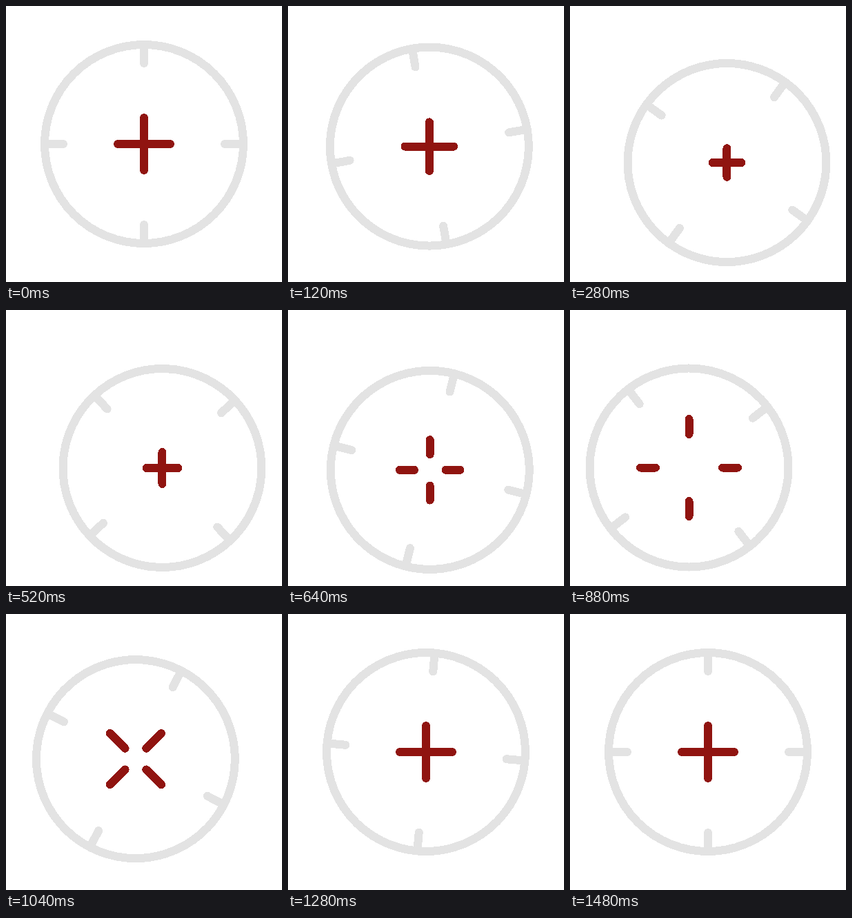
An HTML page that plays this animation: 400 px wide and 400 px high, repeating every 1.56 s.

```html
<!DOCTYPE html>
<html lang="en">
<head>
<meta charset="utf-8">
<title>Crosshair</title>
<style>
  html, body { margin: 0; width: 100%; height: 100%; overflow: hidden; background: #fff; }
  svg { display: block; width: 100%; height: 100%; }
  g { fill: none; stroke-width: 12; stroke-linecap: round; shape-rendering: crispEdges; }
  #ring { stroke: #e3e3e3; }
  #cross { stroke: #901410; }
</style>
</head>
<body>
<svg viewBox="0 0 400 400">
  <g id="sight">
    <g id="ring">
      <circle r="144"/>
      <path d="M0-144V-117M0 144V117M-144 0H-117M144 0H117"/>
    </g>
    <g id="cross"><path id="arms"/></g>
  </g>
</svg>
<script>
const LOOP = 1560, STEP = 40;
const el = id => document.getElementById(id);
const sight = el('sight'), ring = el('ring'), cross = el('cross'), arms = el('arms');

// Cubic ease in and out, from 0 at start to 1 after the duration.
function ease(t, start, duration) {
  const u = Math.min(1, Math.max(0, (t - start) / duration));
  return u < 0.5 ? 4 * u ** 3 : 1 - 4 * (1 - u) ** 3;
}

// Bow of a path leg: zero at both ends.
const bow = e => e * (1 - e);

// Steady speed-up until the peak, then steady slow-down to the end.
function spinDown(t, peak, end) {
  if (t >= end) return 1;
  return t < peak ? t * t / (peak * end) : 1 - (end - t) ** 2 / (end * (end - peak));
}

// Rounded triangle: top, lower right, lower left, top.
function position(t) {
  const a = ease(t, 0, 360), b = ease(t, 423, 465), c = ease(t, 895, 270);
  return [
    200 + 28.5 * a - 56 * b + 27.5 * c + 5 * (bow(a) - bow(c)),
    200 + 28.5 * (a - c) - 5 * (bow(a) + bow(c)) + 14 * bow(b)
  ];
}

// The arms shrink, fly apart, then return and grow.
function armSpan(t) {
  const shrink = ease(t, 0, 360), part = ease(t, 400, 490), join = ease(t, 900, 270);
  const inner = 48.5 * (part - join);
  return [inner, inner + 38 - 18 * shrink + 2 * part + 16 * join];
}

function draw(t) {
  const [x, y] = position(t), [a, b] = armSpan(t);
  sight.setAttribute('transform', `translate(${x} ${y})`);
  ring.setAttribute('transform', `rotate(${-270 * spinDown(t, 267, 1460)})`);
  cross.setAttribute('transform', `rotate(${-90 * ease(t, 905, 270)})`);
  arms.setAttribute('d', `M0 ${-a}V${-b}M0 ${a}V${b}M${-a} 0H${-b}M${a} 0H${b}`);
}

function tick() {
  draw(Math.floor(performance.now() % LOOP / STEP) * STEP);
  requestAnimationFrame(tick);
}
tick();
</script>
</body>
</html>
```
